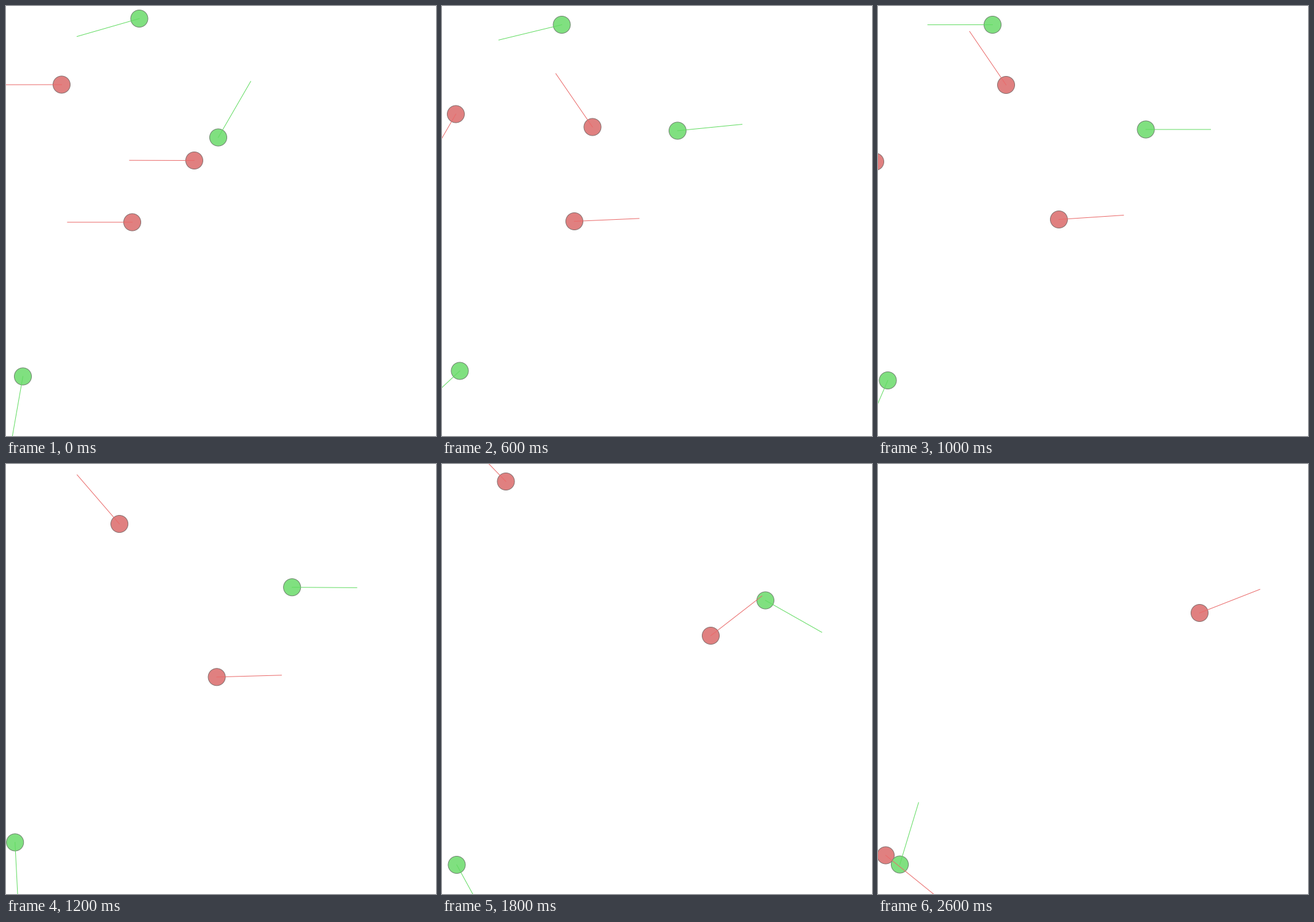
Animation of 700 by 700 pixels, one loop 2.7 s. Source, as a matplotlib script:

```python
import matplotlib.pyplot as plt
import numpy as np
from matplotlib.animation import FuncAnimation
from matplotlib.patches import Circle

SIZE, DPI = 700, 100
FRAMES, INTERVAL = 27, 100
RADIUS, RAY = 14, 105.5
PIXEL = 72 / DPI
START_SPEED = 8

RED = dict(fill="#e08080", ray="#ea6a6a", edge="#86706f")
GREEN = dict(fill="#80e080", ray="#62dc62", edge="#708670")

# All agents pass their key points on the same beat.
BEATS = np.array([0, *range(6, FRAMES, 4)], float)

# Colours, starting heading in degrees (y down), key points.
# An agent lives until its last key point.
AGENTS = [
    (RED, 180, [(90, 127.5), (22, 175.5), (-5, 253), (-48, 340), (-72, 445),
                (-58, 580), (12, 636.5)]),
    (RED, 180, [(306, 251), (244.5, 196.5), (208, 128), (158, 69.5),
                (103.5, 28), (86.5, -4.5)]),
    (RED, 180, [(205, 351.5), (215, 350), (294, 347), (387.5, 338.5),
                (437, 279), (500, 251), (523, 242)]),
    (GREEN, 164, [(216.5, 20), (194.5, 30), (186, 30)]),
    (GREEN, -60, [(345, 213.5), (383, 202.5), (435.5, 200.5), (492.5, 202.5),
                  (526, 221.5)]),
    (GREEN, 100, [(27, 602.5), (28.5, 593.5), (15.5, 609), (15.5, 623.5),
                  (23.5, 652), (33.5, 656.5), (35, 651.5)]),
]


class Agent:
    """A disc on a smooth path; its ray points along the direction of travel."""

    def __init__(self, ax, colors, heading, points):
        self.points = np.array(points) @ [1, 1j]
        self.beats = BEATS[:len(points)]
        self.slopes = np.gradient(self.points, self.beats)
        self.slopes[0] = START_SPEED * np.exp(1j * np.radians(heading))
        self.body = ax.add_patch(Circle((0, 0), RADIUS, fc=colors["fill"],
                                        ec=colors["edge"], lw=PIXEL, zorder=1))
        self.ray, = ax.plot([], [], color=colors["ray"], lw=PIXEL, zorder=2)

    def position(self, t):
        """Cubic Hermite curve through the key points, as x + iy."""
        b, p, s = self.beats, self.points, self.slopes
        i = min(np.searchsorted(b, t, side="right") - 1, len(b) - 2)
        h = b[i + 1] - b[i]
        u = (t - b[i]) / h
        return ((1 + 2 * u) * (1 - u) ** 2 * p[i]
                + u * (1 - u) ** 2 * h * s[i]
                + u * u * (3 - 2 * u) * p[i + 1]
                + u * u * (u - 1) * h * s[i + 1])

    def show(self, t):
        alive = t <= self.beats[-1]
        self.body.set_visible(alive)
        self.ray.set_visible(alive)
        if alive:
            here = self.position(t)
            step = self.position(t + 0.01) - here
            tip = here + RAY * step / abs(step)
            self.body.center = here.real, here.imag
            self.ray.set_data([here.real, tip.real], [here.imag, tip.imag])
        return self.body, self.ray


fig = plt.figure(figsize=(SIZE / DPI, SIZE / DPI), dpi=DPI, facecolor="white")
ax = fig.add_axes([0, 0, 1, 1])
ax.set_xlim(-0.5, SIZE - 0.5)
ax.set_ylim(SIZE - 0.5, -0.5)
ax.axis("off")
agents = [Agent(ax, *spec) for spec in AGENTS]


def update(frame):
    return [artist for agent in agents for artist in agent.show(frame)]


def reset():
    return update(0)


anim = FuncAnimation(fig, update, frames=FRAMES, init_func=reset,
                     interval=INTERVAL, repeat=True, repeat_delay=0)
plt.show()
```
